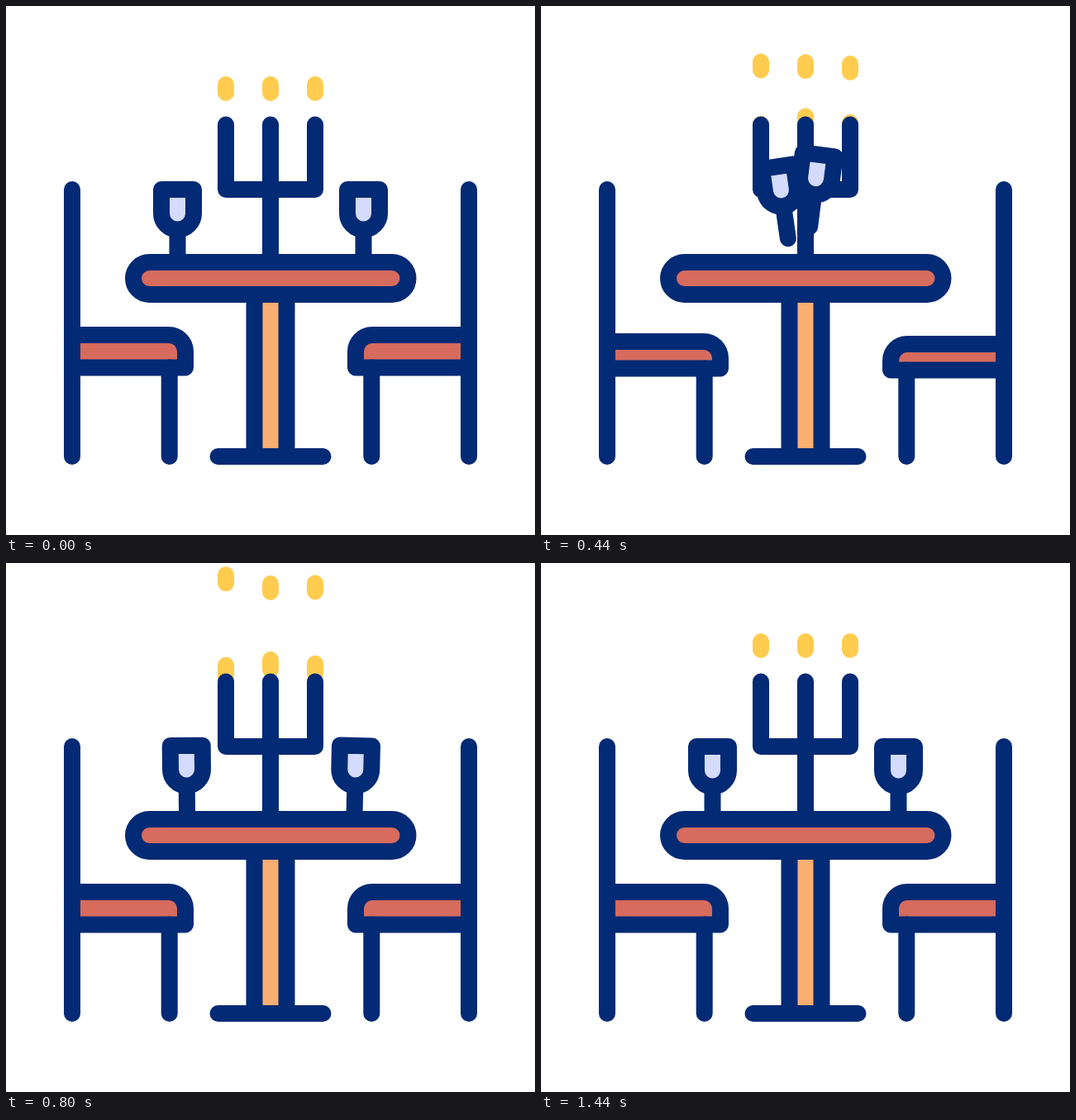
An HTML page with a canvas that plays this animation: 640 by 640 pixels, repeating every 1480 ms.

```html
<!DOCTYPE html>
<html lang="en">
<head>
<meta charset="utf-8">
<title>Dinner for two</title>
<style>
  html, body { margin: 0; width: 100%; height: 100%; overflow: hidden; background: #fff; }
  canvas { display: block; width: 640px; height: 640px; }
</style>
</head>
<body>
<canvas id="stage" width="640" height="640"></canvas>
<script>
const ctx = document.getElementById('stage').getContext('2d');
const LOOP = 1480, STEP = 40;
const NAVY = '#032a75', RED = '#d66b5e', ORANGE = '#faae72', LILAC = '#d4dbfc', YELLOW = '#ffcc50';

const clamp = v => Math.min(1, Math.max(0, v));
const ease = (t, from, to) => {
  const p = clamp((t - from) / (to - from));
  return p * p * (3 - 2 * p);
};
// Rises to 1 at peak, then falls back to 0.
const pulse = (t, from, peak, to) => t < peak ? ease(t, from, peak) : 1 - ease(t, peak, to);

// Eased value through [time, value] pairs.
function track(t, keys) {
  let value = keys[0][1];
  for (let i = 1; i < keys.length; i++) {
    const [t0, v0] = keys[i - 1], [t1, v1] = keys[i];
    if (t >= t0) value = v0 + (v1 - v0) * ease(t, t0, t1);
  }
  return value;
}

function line(color, ...points) {
  ctx.strokeStyle = color;
  ctx.beginPath();
  for (const [x, y] of points) ctx.lineTo(x, y);
  ctx.stroke();
}

function outline(fill) {
  ctx.fillStyle = fill;
  ctx.strokeStyle = NAVY;
  ctx.fill();
  ctx.stroke();
}

const flames = [
  { x: 266, start: 75, end: 1250, speed: 0.0535, lit: 1339 },
  { x: 320, start: 0, end: 1440, speed: 0.046, lit: 1279 },
  { x: 374, start: 40, end: 1400, speed: 0.0535, lit: 1302 }
];

function drawFlame(x, top, length) {
  line(YELLOW, [x, top + 10], [x, top + length - 10]);
}

function drawFlames(t) {
  for (const f of flames) {
    drawFlame(f.x, 85 - 120 * ease(t, f.start, f.end), 30);
    const left = Math.min(50, Math.max(0, f.speed * (f.lit - t)));
    drawFlame(f.x, 85 + left, 30 + Math.min(2, left / 8));
  }
}

function drawCandelabra() {
  line(NAVY, [266, 143.5], [266, 222], [374, 222], [374, 143.5]);
  line(NAVY, [320, 143.5], [320, 310]);
}

// The origin is the foot of the stem.
function drawGlass(x, y, degrees) {
  ctx.save();
  ctx.translate(x, y);
  ctx.rotate(degrees * Math.PI / 180);
  line(NAVY, [0, -40], [0, 0]);
  ctx.beginPath();
  ctx.moveTo(-19.5, -88);
  ctx.lineTo(19.5, -88);
  ctx.lineTo(19.5, -59);
  ctx.arc(0, -59, 19.5, 0, Math.PI);
  ctx.closePath();
  outline(LILAC);
  ctx.restore();
}

function drawGlasses(t) {
  drawGlass(207.5 + 94 * pulse(t, 80, 480, 890),
            310 - 30 * pulse(t, 100, 490, 840),
            -8.2 * pulse(t, 40, 440, 870));
  drawGlass(432.5 - 112 * pulse(t, 80, 490, 875),
            310 - 46 * pulse(t, 100, 505, 830),
            8.6 * pulse(t, 80, 560, 880));
}

function drawTable() {
  ctx.fillStyle = ORANGE;
  ctx.fillRect(300, 349, 40, 196);
  line(NAVY, [300.5, 349], [300.5, 545]);
  line(NAVY, [339.5, 349], [339.5, 545]);
  line(NAVY, [256.5, 545], [383.5, 545]);
  ctx.beginPath();
  ctx.roundRect(154, 310, 332.5, 39, 19.5);
  outline(RED);
}

// Offsets move the back, the seat top and the seat bottom.
function drawChair(back, top, bottom) {
  const y0 = 398 + top, y1 = 437.5 + bottom;
  ctx.beginPath();
  ctx.moveTo(80, y0);
  ctx.lineTo(197, y0);
  ctx.arcTo(217, y0, 217, y0 + 20, 20);
  ctx.lineTo(217, y1);
  ctx.lineTo(80, y1);
  ctx.closePath();
  outline(RED);
  line(NAVY, [80, 222 + back], [80, 545]);
  line(NAVY, [197.7, y1], [197.7, 545]);
}

function drawChairs(t) {
  const hop = (up, down) => track(t, [[40, 0], [280, up], [440, down], [560, 0]]);
  drawChair(hop(-8.5, 0), hop(-9, 8), hop(-9, 1));
  ctx.save();
  ctx.translate(640, 0);
  ctx.scale(-1, 1);
  drawChair(hop(-9.5, 0), hop(-7.8, 11), hop(-6.5, 3));
  ctx.restore();
}

function draw(t) {
  ctx.fillStyle = '#fff';
  ctx.fillRect(0, 0, 640, 640);
  ctx.lineWidth = 20;
  ctx.lineCap = ctx.lineJoin = 'round';
  drawFlames(t);
  drawCandelabra();
  drawGlasses(t);
  drawTable();
  drawChairs(t);
}

let origin;
function tick(now) {
  origin ??= now;
  draw(Math.floor((now - origin) % LOOP / STEP) * STEP);
  requestAnimationFrame(tick);
}
draw(0);
requestAnimationFrame(tick);
</script>
</body>
</html>
```
